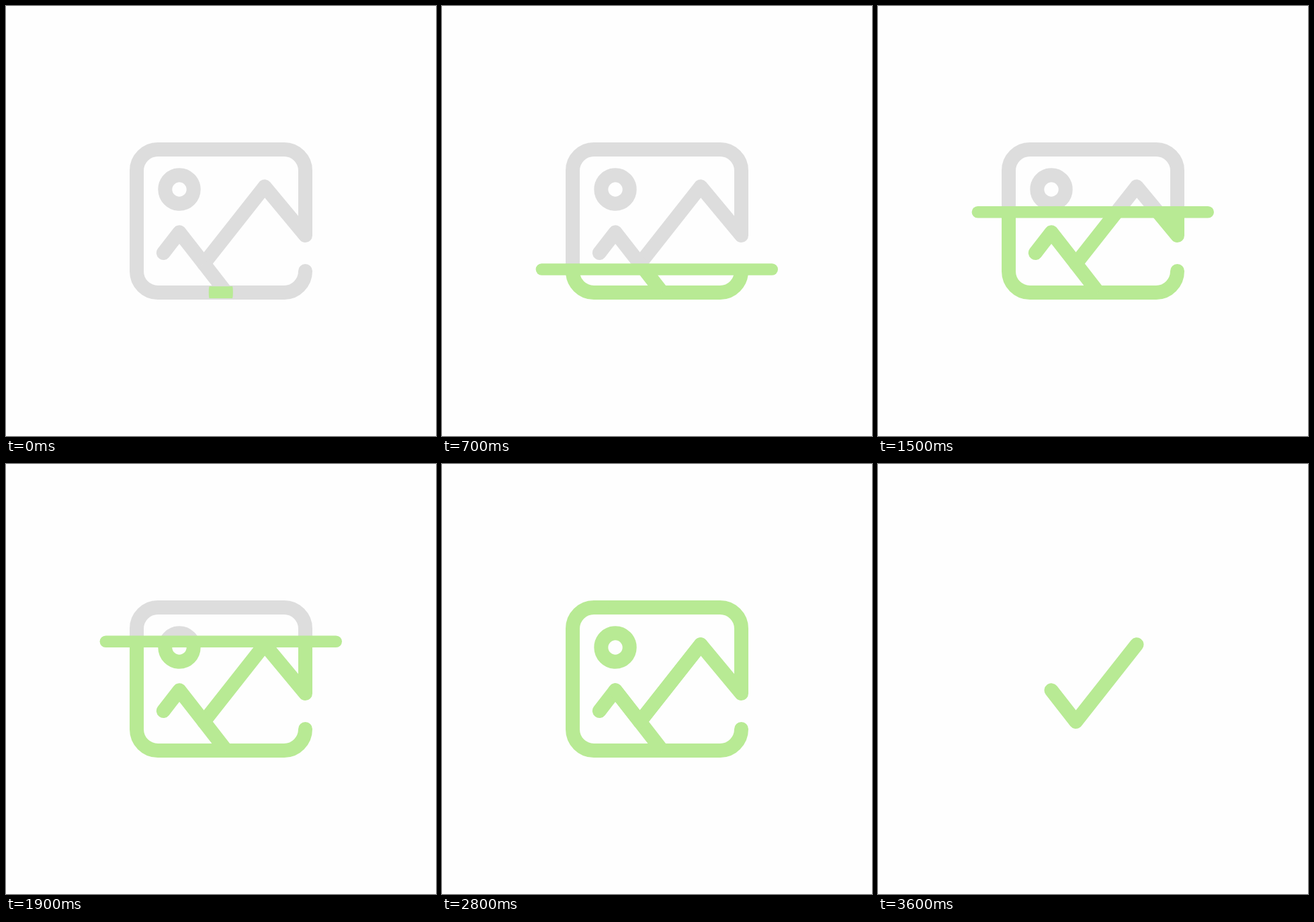
Write an HTML page that moves like this. It is 640 px wide and 640 px high and loops after 6000 ms.

```html
<!DOCTYPE html>
<html lang="en">
<head>
<meta charset="utf-8">
<title>Image scan</title>
<style>
  html, body { margin: 0; width: 100%; height: 100%; overflow: hidden; background: #fefefe; }
  svg { display: block; width: 100%; height: 100%; }
</style>
</head>
<body>
<svg viewBox="0 0 640 640">
  <defs>
    <g id="icon" fill="none" stroke-width="21" stroke-linejoin="round">
      <path stroke-linecap="round" d="M445.5 394.5A31.5 32 0 0 1 414 426.5H226A31.5 31.5 0 0 1 194.5 395V245A31.5 31.5 0 0 1 226 213.5H414A31.5 31.5 0 0 1 445.5 245V341.5L385 268.7L294.5 383.5"/>
      <path stroke-linecap="round" d="M234.3 367.5L258 336.8L294.5 383.5"/>
      <path d="M294.5 383.5L327.5 426"/>
      <circle cx="258" cy="273" r="21.2"/>
    </g>
    <clipPath id="above"><rect id="aboveBox" width="640"/></clipPath>
    <clipPath id="below"><rect id="belowBox" width="640" height="640"/></clipPath>
  </defs>
  <g clip-path="url(#above)"><use href="#icon" stroke="#dddddd"/></g>
  <g id="scanned" clip-path="url(#below)"><use href="#icon" stroke="#b8ea94"/></g>
  <path id="check" d="M258 336.8L294.5 383.5L385 268.7" fill="none" stroke="#b8ea94"
        stroke-width="21" stroke-linecap="round" stroke-linejoin="round"/>
  <rect id="bar" x="-180.2" y="-8.8" width="360.4" height="17.6" rx="8.8" fill="#b8ea94"/>
</svg>
<script>
  const LOOP = 6000, STEP = 40;
  const el = id => document.getElementById(id);
  const bar = el('bar'), check = el('check'), scanned = el('scanned');
  const aboveBox = el('aboveBox'), belowBox = el('belowBox');

  const ramp = (k, from, length) => Math.min(1, Math.max(0, (k - from) / length));
  const mix = (a, b, p) => a + (b - a) * p;

  function draw(time) {
    const k = Math.floor((time % LOOP) / STEP);
    const scan = ramp(k, 9, 50);
    const width = ramp(k, -1, 10) - ramp(k, 64, 10);
    const edge = mix(437.5, 202.5, scan);

    bar.setAttribute('transform', `translate(319.8 ${mix(426.1, 213.1, scan)}) scale(${width} 1)`);
    bar.style.display = width > 0 ? '' : 'none';
    aboveBox.setAttribute('height', edge);
    belowBox.setAttribute('y', edge);
    scanned.setAttribute('opacity', 1 - ramp(k, 79, 10));
    check.style.display = scan === 1 ? '' : 'none';
  }

  const start = performance.now();
  function tick() {
    draw(performance.now() - start);
    requestAnimationFrame(tick);
  }
  tick();
</script>
</body>
</html>
```
